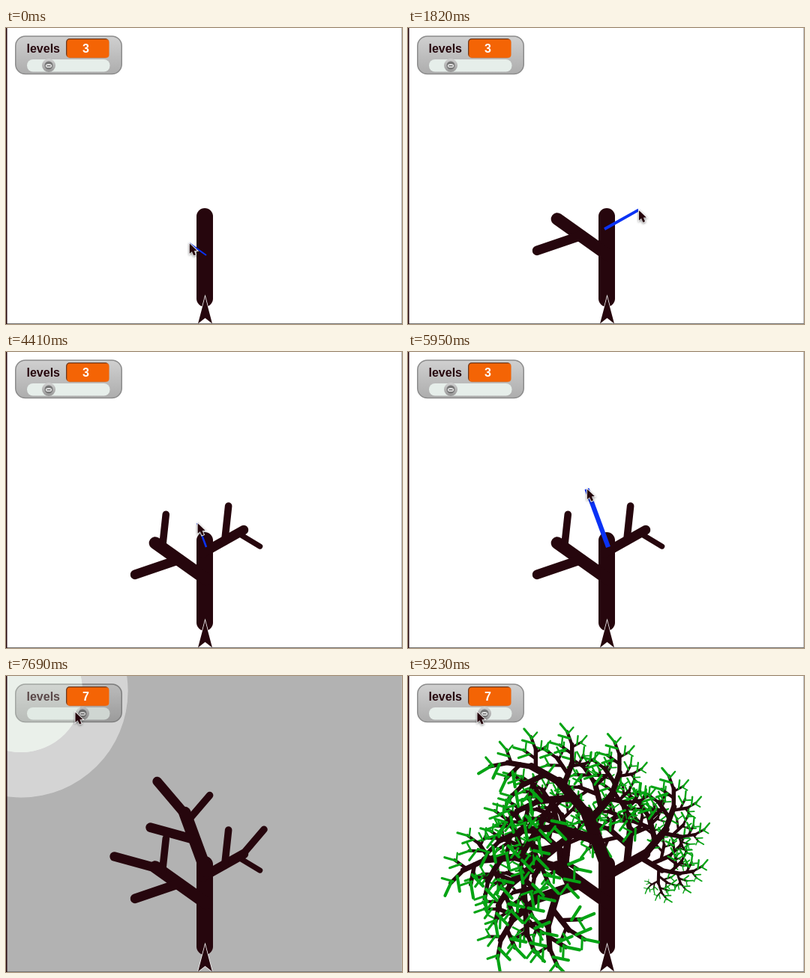
An HTML page with a canvas that plays this animation: 528 px wide and 396 px high, repeating every 9790 ms.

```html
<!DOCTYPE html>
<html lang="en">
<head>
<meta charset="utf-8">
<title>Growing tree</title>
<style>
  html, body { margin: 0; width: 100%; height: 100%; overflow: hidden; background: #fff; }
  canvas { display: block; }
</style>
</head>
<body>
<canvas id="stage" width="528" height="396"></canvas>
<script>
const ctx = document.getElementById('stage').getContext('2d');
const W = 528, H = 396, LOOP = 9790, TICK = 70;
const BARK = '#26060d', LEAF = '#06a414', BLUE = '#0a32f5', ORANGE = '#f46405';
const BASE = { x: 265, y: 362 }, TRUNK = 110, THICK = 22, MAX_LEVEL = 7;
const GLOW_ON = 7420, LEVEL_UP = 7690, GLOW_OFF = 7900;
const BURSTS = [8460, 8950, 9230];

// Each branch is dragged out, dropped, and the tree regrows until `grown`.
const branches = [
  { start: { x: 267, y: 304 }, end: { x: 199, y: 255.5 }, drag: -110, stop: 490, drop: 840, grown: 1120 },
  { start: { x: 262, y: 269 }, end: { x: 317, y: 238 }, drag: 1330, stop: 2170, drop: 3150, grown: 3780 },
  { start: { x: 267, y: 261 }, end: { x: 238.4, y: 183 }, drag: 3920, stop: 6020, drop: 6370, grown: 7210 }
];
for (const b of branches) {
  const dx = b.end.x - b.start.x, dy = b.end.y - b.start.y;
  b.scale = Math.hypot(dx, dy) / TRUNK;
  b.turn = Math.atan2(dx, -dy);
}

const progress = (t, t0, t1) => Math.min(1, Math.max(0, (t - t0) / (t1 - t0)));
const easeOut = p => 1 - (1 - p) ** 2;
const mix = (a, b, p) => ({ x: a.x + (b.x - a.x) * p, y: a.y + (b.y - a.y) * p });
const knobX = level => 57 + (level - 3) * 11.25;

function pointerAt(t, level) {
  if (t >= GLOW_ON) return { x: knobX(level) - 10, y: 48 };
  const i = branches.findLastIndex(b => t >= b.drag);
  const b = branches[i], next = branches[i + 1];
  if (t < b.drop || !next) return mix(b.start, b.end, easeOut(progress(t, b.drag, b.stop)));
  return mix(b.end, next.start, progress(t, b.drop, b.grown));
}

// Every redraw clears the tree and adds it again limb by limb.
function treeAt(t) {
  const bursts = BURSTS.filter(time => t >= time).length;
  if (bursts) {
    const all = (3 ** MAX_LEVEL - 1) / 2;
    return { arms: 3, levels: MAX_LEVEL, limbs: Math.ceil(all * (bursts + 1) / 4) };
  }
  const arms = branches.filter(b => t >= b.drop).length;
  if (!arms) return { arms, levels: 1, limbs: 1 };
  const { drop, grown } = branches[arms - 1];
  const added = Math.floor((arms + arms * arms) * progress(t, drop, grown));
  return { arms, levels: 3, limbs: 1 + added };
}

function drawTree({ arms, levels, limbs }) {
  let left = limbs;
  function limb(depth) {
    if (left-- <= 0) return;
    ctx.strokeStyle = depth === MAX_LEVEL ? LEAF : BARK;
    ctx.beginPath();
    ctx.moveTo(0, 0);
    ctx.lineTo(0, -TRUNK);
    ctx.stroke();
    if (depth === levels) return;
    for (const b of branches.slice(0, arms)) {
      ctx.save();
      ctx.translate(b.start.x - BASE.x, b.start.y - BASE.y);
      ctx.rotate(b.turn);
      ctx.scale(b.scale, b.scale);
      limb(depth + 1);
      ctx.restore();
    }
  }
  ctx.save();
  ctx.translate(BASE.x, BASE.y);
  ctx.lineWidth = THICK;
  ctx.lineCap = 'round';
  limb(1);
  ctx.restore();
}

function drawDrag(t, tip) {
  const b = branches.find(b => t >= b.drag && t < b.drop);
  if (!b) return;
  ctx.beginPath();
  ctx.moveTo(b.start.x, b.start.y);
  ctx.lineTo(tip.x, tip.y);
  ctx.lineWidth = 0.075 * Math.hypot(tip.x - b.start.x, tip.y - b.start.y);
  ctx.strokeStyle = BLUE;
  ctx.stroke();
}

function shape(points, outline) {
  ctx.beginPath();
  points.forEach(([x, y]) => ctx.lineTo(x, y));
  ctx.closePath();
  ctx.lineWidth = outline;
  ctx.strokeStyle = '#fff';
  ctx.stroke();
  ctx.fillStyle = BARK;
  ctx.fill();
}

function box(x, y, w, h, r, fill) {
  ctx.beginPath();
  ctx.roundRect(x, y, w, h, r);
  ctx.fillStyle = fill;
  ctx.fill();
}

function oval(x, y, rx, ry, fill) {
  ctx.beginPath();
  ctx.ellipse(x, y, rx, ry, 0, 0, 7);
  ctx.fillStyle = fill;
  ctx.fill();
}

function fade(y0, y1, from, to) {
  const g = ctx.createLinearGradient(0, y0, 0, y1);
  g.addColorStop(0, from);
  g.addColorStop(1, to);
  return g;
}

function drawPanel(level) {
  box(12.75, 11, 141.5, 50.5, 13, fade(11, 61, '#d0d0d0', '#adadad'));
  ctx.strokeStyle = '#8c8c8c';
  ctx.lineWidth = 1.5;
  ctx.stroke();
  box(28, 42, 110.5, 16.5, 8, '#e6eeea');
  const x = knobX(level);
  oval(x, 50, 9, 9, fade(41, 59, '#d2d2d2', '#969696'));
  oval(x, 50, 5.5, 5.5, '#777');
  oval(x, 50.5, 4.2, 2.6, '#e4e4e4');
  box(x - 2.5, 50, 5, 1.3, 0, '#666');
  ctx.font = 'bold 16px "Liberation Sans", Arial, sans-serif';
  ctx.textAlign = 'left';
  ctx.fillStyle = BARK;
  ctx.fillText('levels', 27.5, 33);
}

function drawValue(level) {
  box(80, 14, 58, 26.5, 5, '#c9a48c');
  box(80, 14, 57, 25.5, 5, '#6b3a20');
  box(81.3, 15.3, 56, 24.5, 4, ORANGE);
  ctx.fillStyle = '#fff';
  ctx.textAlign = 'center';
  ctx.fillText(level, 106.5, 33);
}

// Dimmed screen with two brighter rings around the corner.
function drawGlow() {
  const c = 20, inner = 82, outer = 142.5, full = 2 * Math.PI;
  ctx.beginPath();
  ctx.rect(0, 0, W, H);
  ctx.arc(c, c, outer, 0, full);
  ctx.fillStyle = 'rgba(0,0,0,.3)';
  ctx.fill('evenodd');
  ctx.beginPath();
  ctx.arc(c, c, outer, 0, full);
  ctx.arc(c, c, inner, 0, full);
  ctx.fillStyle = 'rgba(0,0,0,.17)';
  ctx.fill('evenodd');
  oval(c, c, inner, inner, 'rgba(213,225,213,.5)');
}

function drawPanelGlow() {
  ctx.save();
  ctx.beginPath();
  ctx.roundRect(12, 10, 143, 52, 13);
  ctx.clip();
  ctx.globalAlpha = 0.6;
  drawGlow();
  ctx.restore();
}

function drawPointer({ x, y }) {
  ctx.save();
  ctx.translate(x, y);
  ctx.shadowColor = 'rgba(0,0,0,.35)';
  ctx.shadowBlur = 3;
  ctx.shadowOffsetY = 1;
  shape([[0.5, 0.5], [0.5, 14], [3.6, 11.2], [6, 16.5], [8.6, 15.4], [6.3, 10.2], [10.4, 10]], 2);
  ctx.restore();
}

function drawBorder() {
  box(527, 0, 1, H, 0, '#b8b8b8');
  box(0, 395, W, 1, 0, '#777');
  box(0, 0, 1.5, H, 0, BARK);
}

function draw(now) {
  const t = Math.floor((now % LOOP) / TICK) * TICK;
  const level = t < LEVEL_UP ? 3 : MAX_LEVEL;
  const glow = t >= GLOW_ON && t < GLOW_OFF;
  const tip = pointerAt(t, level);

  box(0, 0, W, H, 0, '#fff');
  if (glow) drawGlow();
  drawTree(treeAt(t));
  drawDrag(t, tip);
  shape([[265.5, 359.5], [275, 395.5], [265.5, 388], [256, 395.5]], 1.5);
  drawPanel(level);
  if (glow) drawPanelGlow();
  drawValue(level);
  drawBorder();
  drawPointer(tip);
}

// A small lead keeps late ticks from slipping by one display refresh.
const start = performance.now() - 25;
function loop() {
  draw(performance.now() - start);
  requestAnimationFrame(loop);
}
loop();
</script>
</body>
</html>
```
